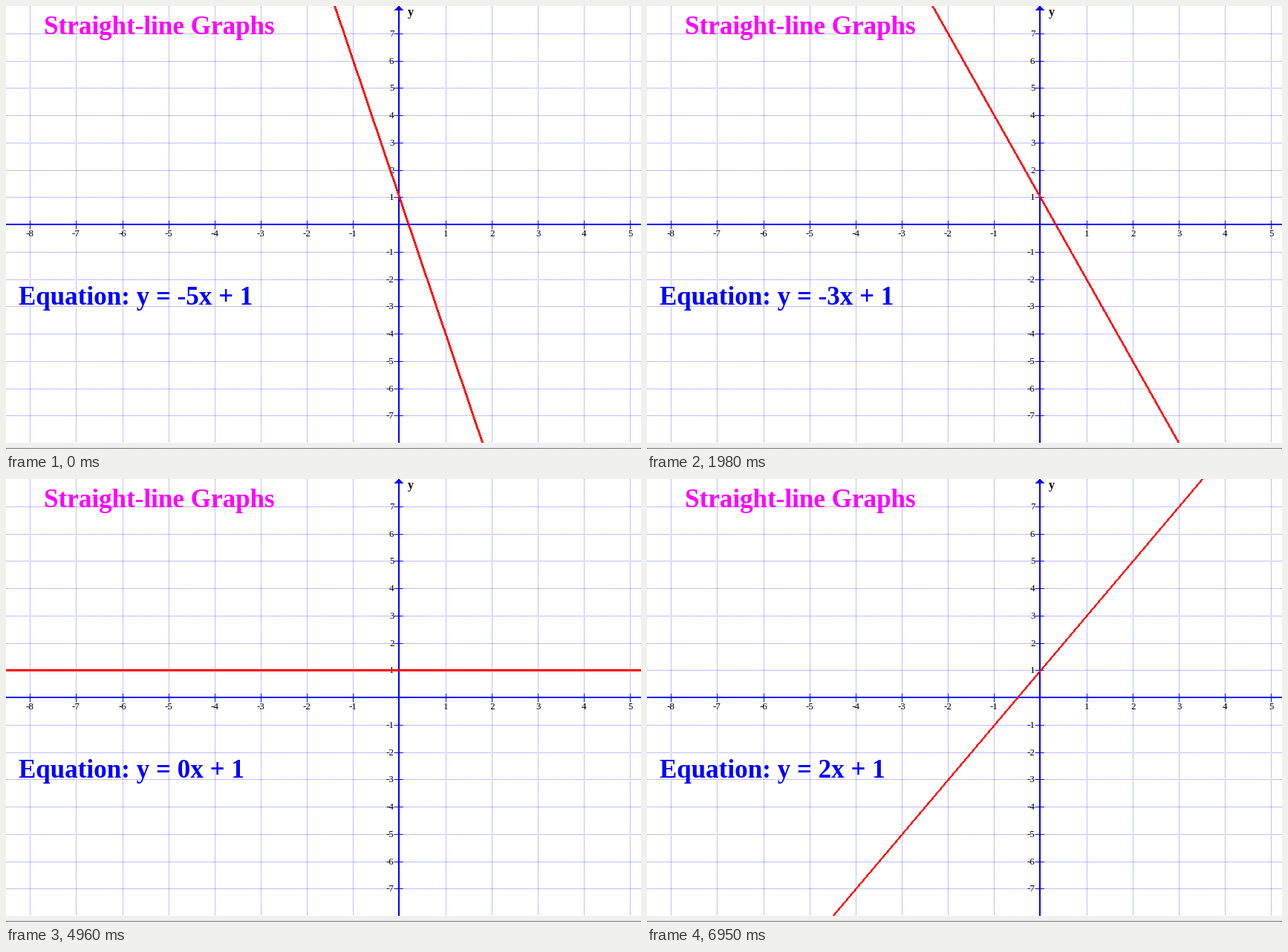
These frames come from a looping animation (855 px wide and 599 px high, 7990 ms). A matplotlib script:

```python
import matplotlib.pyplot as plt
import numpy as np
from matplotlib.animation import FuncAnimation
from matplotlib.patches import Polygon, Rectangle

W, H, PLOT_H = 855, 599, 588
DPI = 64
PT = 72 / DPI                      # points per pixel
X0, Y0 = 529.45, 294.2             # origin of the graph
UX, UY = 62.15, 36.75              # pixels per unit

INTERVAL, FRAMES = 34, 235
CHANGES = [980, 1980, 2980, 3980, 4960, 5970, 6950]
FIRST_SLOPE = -5

BLUE = (0, 0, 255)
GRID = (128, 128, 255)
XS = [k for k in range(-8, 6) if k]
YS = [k for k in range(-7, 8) if k]


def col(k):
    return int(X0 + UX * k + 0.5)


def row(k):
    return int(Y0 - UY * k + 0.5)


def draw_grid():
    img = np.full((H, W, 3), 255, np.uint8)
    for k in XS:
        img[0:PLOT_H:2, col(k)] = GRID
    for k in YS:
        img[row(k), ::2] = GRID
    img[293:295, :] = BLUE
    img[0:PLOT_H, 528:530] = BLUE
    for k in XS:
        img[289:300, col(k)] = BLUE
    for k in YS:
        img[row(k), 523:535] = BLUE
    img[PLOT_H:] = 240
    img[595, ::2] = 0
    return img


def band(slope):
    """Outline of y = slope * x + 1 as a stepped line three pixels thick."""
    m = -slope * UY / UX
    y_cut = Y0 - UY
    steep = abs(m) > 1
    u = np.arange(H if steep else W)
    v = X0 + (u - y_cut) / m if steep else y_cut + m * (u - X0)
    v = np.repeat(np.floor(v + 0.5), 2)
    u = np.column_stack((u, u + 1)).ravel()
    along = np.concatenate((u, u[::-1]))
    across = np.concatenate((v - 1, v[::-1] + 2))
    return np.column_stack((across, along) if steep else (along, across))


fig = plt.figure(figsize=(W / DPI, H / DPI), dpi=DPI, facecolor="white")
ax = fig.add_axes([0, 0, 1, 1])
ax.imshow(draw_grid(), extent=(0, W, H, 0), interpolation="nearest",
          aspect="auto", zorder=0)
ax.set_xlim(0, W)
ax.set_ylim(H, 0)
ax.axis("off")


def label(x, y, text, size, color="black", weight="normal", z=2):
    return ax.text(x, y, text, fontsize=size * PT, color=color, weight=weight,
                   family="Liberation Serif", ha="left", va="baseline",
                   zorder=z)


ax.add_patch(Polygon([(529, -0.5), (535.5, 6), (522.5, 6)],
                     fc="#0000ff", lw=0, zorder=1))
for k in XS:
    label(col(k) - (5 if k < 0 else 3), 310, str(k), 13)
for k in YS:
    label(512 if k < 0 else 516, row(k) + 4, str(k), 13)
label(541, 13, "y", 16, weight="bold")
label(51, 38, "Straight-line Graphs", 35, "#ff00ff", "bold", 5)
equation = label(17, 402, "", 35, "#0000ff", "bold", 5)

line = ax.add_patch(Polygon(band(FIRST_SLOPE), fc="#ff0000", lw=0,
                            snap=False, zorder=3))
line.set_clip_path(Rectangle((0, 0), W, PLOT_H, transform=ax.transData))


def update(i):
    # a change shows in the frame that contains it
    t = (i + 1) * INTERVAL
    slope = FIRST_SLOPE + sum(t >= c for c in CHANGES)
    line.set_xy(band(slope))
    equation.set_text(f"Equation: y = {slope}x + 1")
    return line, equation


anim = FuncAnimation(fig, update, frames=FRAMES, interval=INTERVAL,
                     repeat=True, repeat_delay=0, blit=False)
plt.show()
```
